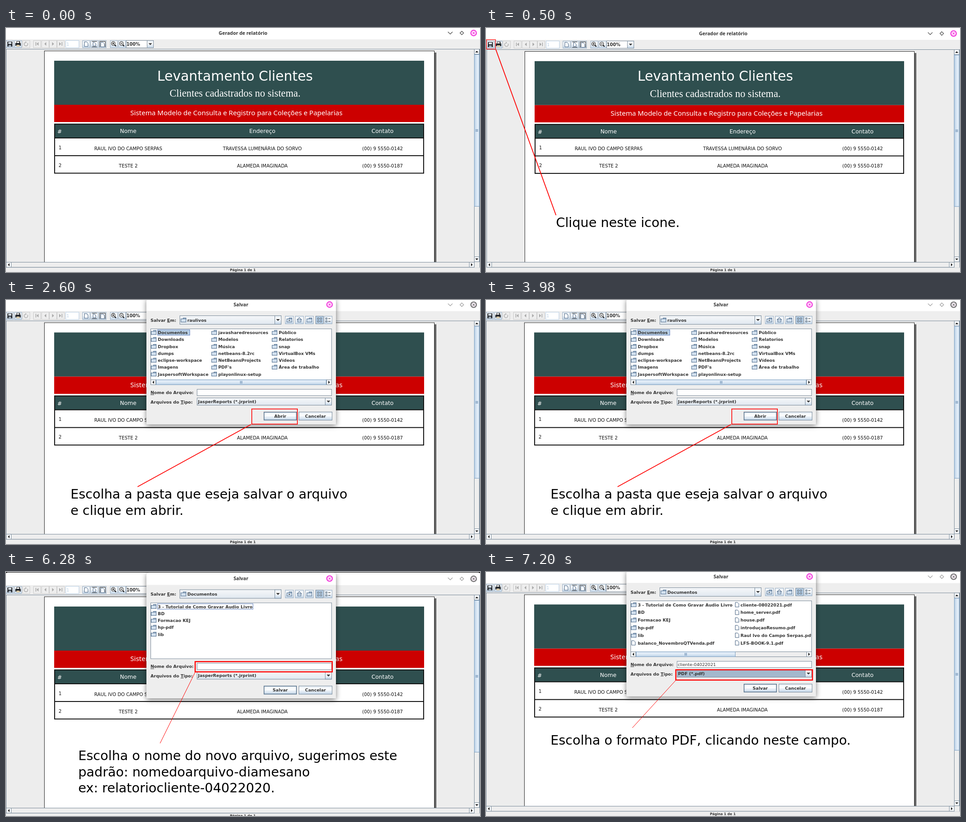
An HTML page with a canvas that plays this animation: 1043x537 px, repeating every 8000 ms.

```html
<!DOCTYPE html>
<html lang="pt-BR">
<head>
<meta charset="utf-8">
<title>Gerador de relatório</title>
<style>
  html, body { margin: 0; width: 100%; height: 100%; overflow: hidden; background: #fff; }
  canvas { display: block; width: 100%; height: 100%; }
</style>
</head>
<body>
<canvas id="stage" width="1043" height="537"></canvas>
<script>
const ctx = document.getElementById('stage').getContext('2d');
const W = 1043, H = 537;
const SANS = '"DejaVu Sans", sans-serif';
const SERIF = '"Liberation Serif", serif';
const NOTO = '"Noto Sans", sans-serif';
const UI = 'bold 9.4px ' + SANS;
const EDGE = '#7a8a99', PANEL = '#eeeeee', INK = '#333333';
const SLATE = '#2f4f4f', RED = '#cc0000', MARK = '#ff0000', PINK = '#f23ddd';

function text(str, x, y, font, color = INK, align = 'left') {
  ctx.font = font;
  ctx.fillStyle = color;
  ctx.textAlign = align;
  ctx.fillText(str, x, y);
}

function rect(x, y, w, h, fill) {
  ctx.fillStyle = fill;
  ctx.fillRect(x, y, w, h);
}

function box(x, y, w, h, fill, stroke = EDGE, lw = 1) {
  if (fill) rect(x, y, w, h, fill);
  ctx.strokeStyle = stroke;
  ctx.lineWidth = lw;
  ctx.strokeRect(x + lw / 2, y + lw / 2, w - lw, h - lw);
}

function line(points, color, lw = 1) {
  ctx.beginPath();
  for (let i = 0; i < points.length; i += 2) ctx.lineTo(points[i], points[i + 1]);
  ctx.strokeStyle = color;
  ctx.lineWidth = lw;
  ctx.stroke();
}

function disc(x, y, r, color) {
  ctx.beginPath();
  ctx.arc(x, y, r, 0, Math.PI * 2);
  ctx.fillStyle = color;
  ctx.fill();
}

// Direction in quarter turns: 0 right, 1 down, 2 left, 3 up
function arrow(x, y, r, dir, color = INK) {
  ctx.save();
  ctx.translate(x, y);
  ctx.rotate(dir * Math.PI / 2);
  ctx.beginPath();
  ctx.moveTo(-r / 2, -r);
  ctx.lineTo(r / 2, 0);
  ctx.lineTo(-r / 2, r);
  ctx.fillStyle = color;
  ctx.fill();
  ctx.restore();
}

function shade(y, h, top, mid, low) {
  const g = ctx.createLinearGradient(0, y, 0, y + h);
  g.addColorStop(0, top);
  g.addColorStop(0.4, mid);
  g.addColorStop(1, low);
  return g;
}
const glossy = (y, h) => shade(y, h, '#e2ebf4', '#ffffff', '#bfd3e7');

function scrollbar(x, y, len, from, to, vertical) {
  ctx.save();
  ctx.translate(vertical ? x + 12 : x, y);
  if (vertical) ctx.rotate(Math.PI / 2);
  box(0, 0, len, 12, PANEL);
  for (const [bx, dir] of [[0, 2], [len - 12, 0]]) {
    box(bx, 0, 12, 12, '#f6f8fa');
    arrow(bx + 6, 6, 3.4, dir, '#111');
  }
  if (to > from) {
    box(from, 0, to - from, 12, shade(0, 12, '#d3e2f1', '#e4eef8', '#b4cce4'), '#7d9fc0');
    const c = (from + to) / 2;
    for (let i = -1; i < 2; i++) rect(c + i * 2 - 0.5, 3, 1, 6, '#6c8fb3');
  }
  ctx.restore();
}

function closeButton(x, y, color) {
  disc(x, y, 7.2, color);
  disc(x, y, 4.8, '#fff4fd');
  line([x - 2.3, y - 2.3, x + 2.3, y + 2.3], color, 1.3);
  line([x + 2.3, y - 2.3, x - 2.3, y + 2.3], color, 1.3);
}

function sheet(x, y, w, h) {
  ctx.beginPath();
  ctx.moveTo(x, y);
  ctx.lineTo(x + w - 3, y);
  ctx.lineTo(x + w, y + 3);
  ctx.lineTo(x + w, y + h);
  ctx.lineTo(x, y + h);
  ctx.closePath();
  ctx.fillStyle = '#f6f9fc';
  ctx.fill();
  ctx.strokeStyle = '#4a6482';
  ctx.lineWidth = 1;
  ctx.stroke();
}

function folder(x, y) {
  box(x + 5, y - 5, 7, 4, '#b8cfe5', '#4f6b8a');
  box(x, y - 3, 12, 8, '#d3e1ef', '#4f6b8a');
}

function magnifier(x, plus) {
  line([x + 2, 37, x + 5, 40], '#111', 2.2);
  disc(x - 1, 34, 4.6, '#111');
  disc(x - 1, 34, 3.5, '#fff');
  rect(x - 3, 33.4, 4, 1.3, '#111');
  if (plus) rect(x - 1.6, 32, 1.3, 4, '#111');
}

function toolbar() {
  for (const x of [0, 18, 168, 186, 204, 229, 247]) box(x, 27, 17, 17, glossy(27, 17), '#9db0c3');
  for (const x of [36, 60, 78, 95, 112]) box(x, 27, 17, 17, PANEL, '#cccccc');

  rect(3, 30, 11, 11, '#1b1f25');
  rect(5, 31, 7, 4, '#dfe7ee');
  rect(5.5, 37, 6, 4, '#9aa7b4');

  rect(23, 29, 8, 5, '#333');
  rect(24, 30, 5, 3, '#fff');
  rect(20.5, 33, 12, 6, '#24282d');
  rect(23, 37, 7, 4, '#d8c9a8');

  ctx.beginPath();
  ctx.arc(44, 35.5, 4, -0.6, 4.2);
  ctx.strokeStyle = '#aaaaaa';
  ctx.lineWidth = 1.4;
  ctx.stroke();
  arrow(44, 31.5, 2.5, 0, '#aaaaaa');

  const off = '#a6a6a6';
  rect(65, 31, 1.5, 8, off);
  arrow(69.5, 35, 4, 2, off);
  arrow(86.5, 35, 4, 2, off);
  arrow(103.5, 35, 4, 0, off);
  arrow(119, 35, 4, 0, off);
  rect(122.5, 31, 1.5, 8, off);

  box(131, 27, 30, 17, '#fff', '#b8cfe5');
  text('1', 133, 39, '9.4px ' + SANS, '#b8cfe5');

  sheet(172.5, 30.5, 8, 10);
  sheet(191.5, 31.5, 6, 8);
  line([189, 29.5, 200, 29.5], '#222');
  line([189, 41.5, 200, 41.5], '#222');
  sheet(208.5, 31.5, 8, 10);
  line([206.5, 42, 206.5, 29.5, 218.5, 29.5, 218.5, 42], '#222');

  magnifier(237, true);
  magnifier(255, false);

  box(264, 27, 61, 17, '#fff');
  text('100%', 265, 39, 'bold 9.7px ' + SANS);
  box(310, 27, 15, 17, glossy(27, 17));
  arrow(317.5, 35.5, 4, 1);
}

function report() {
  rect(943, 54, 4, 470, '#666666');
  box(84, 50, 859, 480, '#fff', '#222');
  rect(106, 72, 814, 97, SLATE);
  rect(106, 169, 814, 38, RED);
  text('Levantamento Clientes', 504, 115.5, '29.6px ' + SANS, '#fff', 'center');
  text('Clientes cadastrados no sistema.', 504, 151, '22.25px ' + SERIF, '#fff', 'center');
  text('Sistema Modelo de Consulta e Registro para Coleções e Papelarias', 507, 192,
    '15px ' + NOTO, '#fff', 'center');

  rect(106, 211, 814, 31, SLATE);
  box(106, 210.5, 814, 110, null, '#111', 2);
  rect(106, 241, 814, 2, '#111');
  rect(106, 280, 814, 2, '#111');

  const cols = [269, 564, 828.5];
  const row = (cells, y, font, color) =>
    cells.forEach((s, i) => text(s, cols[i], y, font, color, 'center'));
  const head = '12.3px ' + SANS, cell = '10.2px ' + SANS;
  text('#', 118, 232, head, '#fff', 'center');
  row(['Nome', 'Endereço', 'Contato'], 231.3, head, '#fff');
  text('1', 119, 266.7, cell, '#111', 'center');
  row(['RAUL IVO DO CAMPO SERPAS', 'TRAVESSA LUMENÁRIA DO SORVO', '(00) 9 5550-0142'], 268.7, cell, '#111');
  text('2', 119, 305.5, cell, '#111', 'center');
  row(['TESTE 2', 'ALAMEDA IMAGINADA', '(00) 9 5550-0187'], 306.8, cell, '#111');
}

function mainWindow(active) {
  ctx.beginPath();
  ctx.roundRect(-2, -3, W + 4, H + 20, 6);
  ctx.fillStyle = '#fff';
  ctx.fill();
  const tone = active ? '#444' : '#999';
  if (active) text('Gerador de relatório', 521.5, 15, 'bold 10.5px ' + NOTO, INK, 'center');
  line([972.5, 8.5, 977.5, 13.5, 982.5, 8.5], tone, 1.2);
  line([1003, 7, 1007, 11, 1003, 15, 999, 11, 1003, 7, 1004, 8], tone, 1.2);
  closeButton(1029, 11, active ? PINK : '#777');

  rect(-2, 25, W + 4, H, PANEL);
  toolbar();
  ctx.save();
  ctx.beginPath();
  ctx.rect(0, 46, 1031, 469);
  ctx.clip();
  rect(0, 46, 1031, 469, '#ededed');
  report();
  ctx.restore();
  rect(0, 46, W, 1, EDGE);
  rect(0, 46, 1, 469, EDGE);
  scrollbar(1030, 46, 469, 12, 347, true);
  scrollbar(0, 515, 1031, 0, 0, false);
  rect(1042, 46, 1, 481, EDGE);
  rect(0, 527, W, 1, '#d5d9dd');
  text('Página 1 de 1', 521, 535, 'bold 7.4px ' + SANS, INK, 'center');
}

// Label with one underlined access key
function label(before, key, after, y) {
  text(before + key + after, 318, y, UI);
  const x = 318 + ctx.measureText(before).width;
  rect(x, y + 1, ctx.measureText(key).width, 1, INK);
}

function button(str, x, w, main) {
  box(x, 246, w, 19, glossy(246, 19), main ? '#5f7890' : EDGE, main ? 1.6 : 1);
  text(str, x + w / 2, 259, UI, INK, 'center');
}

function dropArrow(x, y, h) {
  box(x, y, 15, h, glossy(y, h));
  arrow(x + 7.5, y + h / 2, 4.2, 1);
}

function chooserIcons() {
  for (const x of [614, 636, 658]) box(x, 35, 19, 18, glossy(35, 18), '#9db0c3');
  box(681, 35, 18, 18, '#b8cfe5');
  box(700, 35, 18, 18, glossy(35, 18), '#9db0c3');
  folder(617.5, 44);
  arrow(623.5, 44.5, 2.2, 3);
  line([640, 44, 645.5, 39, 651, 44], '#4f6b8a', 1.2);
  box(641.5, 43, 8, 6, '#d3e1ef', '#4f6b8a');
  folder(661.5, 44);
  for (const y of [39, 45]) {
    for (const x of [685, 691]) box(x, y, 4, 4, '#fff', '#3e5871');
    box(703, y, 4, 4, '#fff', '#3e5871');
    rect(709, y + 1.5, 5, 1, '#333');
  }
}

function fileList(s) {
  box(318, 63, 399, 124, '#fff');
  ctx.save();
  ctx.beginPath();
  ctx.rect(319, 64, 397, 122);
  ctx.clip();
  if (s.focus) box(333, 65, s.focus, 13, s.picked ? '#b8cfe5' : null, '#6382bf');
  s.columns.forEach(([x, names]) => names.split('|').forEach((name, i) => {
    const y = s.top + i * s.step;
    const isFile = name.endsWith('.pdf');
    if (isFile) sheet(x + 1.5, y - 5, 8, 10);
    else folder(x, y);
    text(name, x + (isFile && x > 400 ? 13 : 15), y + 3.6, UI);
  }));
  ctx.restore();
  if (s.thumb) scrollbar(318, 175, 399, 12, s.thumb, false);
}

function dialog(s) {
  ctx.save();
  ctx.shadowColor = 'rgba(0,0,0,.5)';
  ctx.shadowBlur = 12;
  ctx.shadowOffsetY = 3;
  ctx.beginPath();
  ctx.roundRect(309, -3.5, 417, 277, [6, 6, 2, 2]);
  ctx.fillStyle = '#fff';
  ctx.fill();
  ctx.restore();
  rect(309, 24, 417, 249.5, PANEL);
  text('Salvar', 517, 14, 'bold 10.5px ' + NOTO, INK, 'center');
  closeButton(712, 10, PINK);

  label('Salvar ', 'E', 'm:', 47.5);
  box(382, 34, 224, 20, shade(34, 20, '#f4f6f8', '#eef2f6', '#dfe7ef'));
  folder(384.5, 44);
  text(s.dir, 399, 47.5, UI);
  dropArrow(591, 34, 20);
  chooserIcons();
  fileList(s);

  label('', 'N', 'ome do Arquivo:', 207);
  box(420, 196, 297, 15, '#fff');
  if (s.file) text(s.file, 422, 207, '9.5px ' + SANS);
  label('Arquivos do ', 'T', 'ipo:', 227.5);
  box(420, 215, 297, 17, s.typeFocus ? '#a3b8cc' : shade(215, 17, '#f4f6f8', '#eef2f6', '#dfe7ef'));
  text(s.type, 422.5, 227, UI);
  dropArrow(702, 215, 17);
  button(s.action, 567, 73, true);
  button('Cancelar', 644, 74, false);
}

const DOC_DIRS = '3 - Tutorial de Como Gravar Audio Livro|BD|Formacao KEJ|hp-pdf|lib';
const JASPER = 'JasperReports (*.jrprint)';

// frame: x, y, w, h, weight of the red box; pointer: line ends and weight
const scenes = [
  { until: 500, view: [1, 1, 0, 0] },
  {
    until: 2600, view: [0.9988, 0.998, 1.1, 1.1],
    frame: [0.5, 25, 21, 22, 1.2], pointer: [21.5, 47, 154, 412, 1.8],
    note: ['Clique neste icone.'], at: [154, 438]
  },
  {
    until: 4900, view: [1, 1.001, 0, -0.6], shift: 0,
    chooser: {
      dir: 'raulivos', type: JASPER, action: 'Abrir', top: 71.5, step: 15.25,
      focus: 72, picked: true, thumb: 387,
      columns: [
        [319, 'Documentos|Downloads|Dropbox|dumps|eclipse-workspace|Imagens|JaspersoftWorkspace'],
        [452, 'javasharedresources|Modelos|Música|netbeans-8.2rc|NetBeansProjects|PDF\'s|playonlinux-setup'],
        [585, 'Público|Relatorios|snap|VirtualBox VMs|Vídeos|Área de trabalho']
      ]
    },
    frame: [540, 239, 102, 35, 1.6], pointer: [539, 274, 289.5, 411, 1.5],
    note: ['Escolha a pasta que eseja salvar o arquivo', 'e clique em abrir.'], at: [142, 437]
  },
  {
    until: 7200, view: [1, 1, 0, 4], shift: 4.4,
    chooser: {
      dir: 'Documentos', type: JASPER, action: 'Salvar', top: 71.5, step: 15.25, focus: 211,
      columns: [[319, DOC_DIRS]]
    },
    frame: [415, 196, 304, 25, 2.4], pointer: [416, 221, 339, 377, 1],
    note: ['Escolha o nome do novo arquivo, sugerimos este', 'padrão: nomedoarquivo-diamesano',
      'ex: relatoriocliente-04022020.'], at: [159, 414]
  },
  {
    until: 8000, view: [1, 1.001, 0, -0.6], shift: 0,
    chooser: {
      dir: 'Documentos', type: 'PDF (*.pdf)', action: 'Salvar', top: 72, step: 16.8,
      thumb: 231, file: 'cliente-04022021', typeFocus: true,
      columns: [
        [319, DOC_DIRS + '|balanco_NovembroQTVenda.pdf'],
        [547, 'cliente-08022021.pdf|home_server.pdf|house.pdf|introduçaoResumo.pdf|Raul Ivo do Campo Serpas.pdf|LFS-BOOK-9.1.pdf']
      ]
    },
    frame: [416.5, 214, 303, 25, 2.4], pointer: [417, 239, 322, 343, 1],
    note: ['Escolha o formato PDF, clicando neste campo.'], at: [142, 380]
  }
];

function draw(t) {
  const s = scenes.find(scene => t < scene.until);
  const [sx, sy, dx, dy] = s.view;
  ctx.setTransform(1, 0, 0, 1, 0, 0);
  rect(0, 0, W, H, dy > 2 ? '#000' : '#fff');
  ctx.setTransform(sx, 0, 0, sy, dx, dy);
  mainWindow(!s.chooser);
  if (s.chooser) {
    ctx.setTransform(1, 0, 0, 1, 0, s.shift);
    dialog(s.chooser);
  }
  ctx.setTransform(1, 0, 0, 1, 0, 0);
  if (!s.note) return;
  const [x, y, w, h, lw] = s.frame;
  box(x, y, w, h, null, MARK, lw);
  line(s.pointer.slice(0, 4), MARK, s.pointer[4]);
  s.note.forEach((str, i) => text(str, s.at[0], s.at[1] + i * 35.5, '28.5px ' + SANS, '#000'));
}

const start = performance.now();
function tick() {
  draw((performance.now() - start) % 8000);
  requestAnimationFrame(tick);
}
tick();
</script>
</body>
</html>
```
